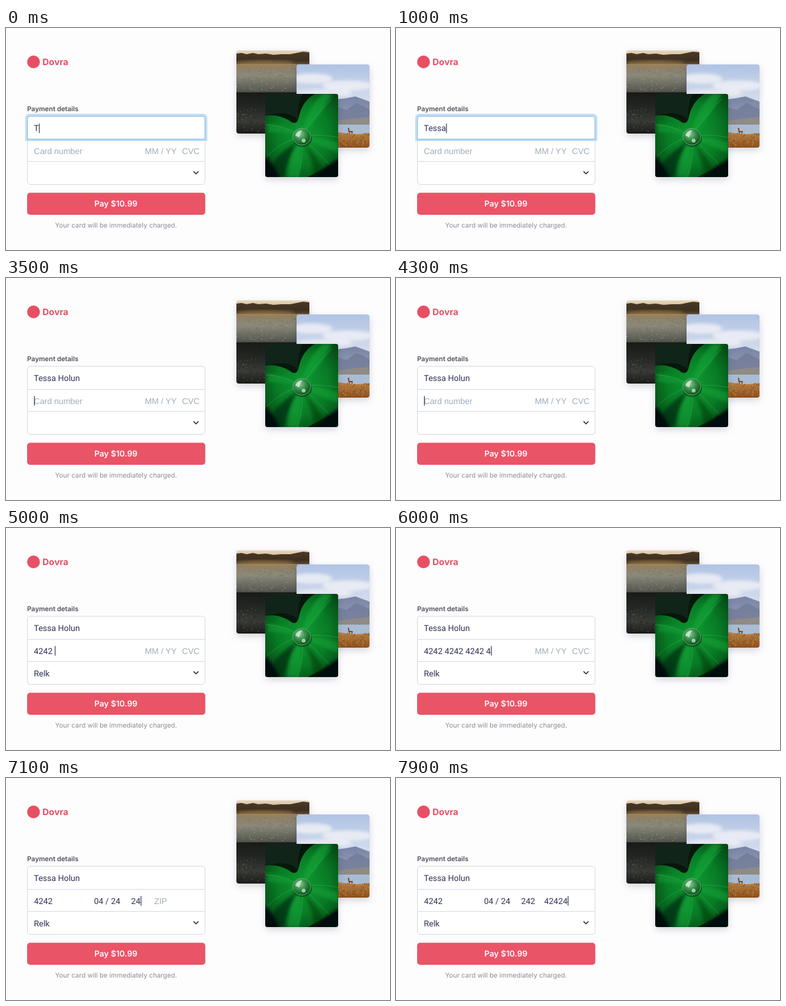
An HTML page for the animation above (8000 ms loop, 600x347 px).

```html
<!DOCTYPE html>
<html lang="en">
<head>
<meta charset="utf-8">
<title>Checkout form</title>
<style>
  html, body { margin: 0; width: 100%; height: 100%; overflow: hidden; background: #fefdfe; }
  svg { display: block; width: 100%; height: 100%; }
  text { white-space: pre; text-rendering: geometricPrecision; }
  .ui { font-family: Inter, sans-serif; }
  .field { font: 13px Roboto, sans-serif; fill: #2f3156; }
  .field.empty { font: 13px "Liberation Sans", Arial, sans-serif; fill: #a1adba; }
  .photo { filter: drop-shadow(0 4px 6px rgba(40, 40, 70, .2)); }
</style>
</head>
<body>
<svg viewBox="0 0 600 347" preserveAspectRatio="none">
  <defs>
    <clipPath id="frame"><rect width="114" height="130" rx="4"/></clipPath>
    <clipPath id="cardRow"><rect x="43" y="176" width="260" height="31"/></clipPath>
    <filter id="soft"><feGaussianBlur stdDeviation="2.5"/></filter>
    <linearGradient id="dusk" x2="0" y2="1">
      <stop offset="0" stop-color="#e6d9c0"/><stop offset="1" stop-color="#b98c4e"/>
    </linearGradient>
    <linearGradient id="trees" x2="0" y2="1">
      <stop offset="0" stop-color="#4a3a26"/><stop offset=".6" stop-color="#3d3021"/><stop offset="1" stop-color="#6b5537"/>
    </linearGradient>
    <linearGradient id="frost" x2="0" y2="1">
      <stop offset="0" stop-color="#8f7c5c"/><stop offset=".4" stop-color="#8a887a"/><stop offset="1" stop-color="#4d5048"/>
    </linearGradient>
    <linearGradient id="soil" x2="0" y2="1">
      <stop offset="0" stop-color="#181a18"/><stop offset=".4" stop-color="#262825"/><stop offset=".7" stop-color="#383a35"/><stop offset="1" stop-color="#1a1917"/>
    </linearGradient>
    <linearGradient id="sky" x2="0" y2="1">
      <stop offset="0" stop-color="#b0c3e4"/><stop offset="1" stop-color="#dde2ee"/>
    </linearGradient>
    <linearGradient id="hill" x2="0" y2="1">
      <stop offset="0" stop-color="#7784a5"/><stop offset="1" stop-color="#a0a6b8"/>
    </linearGradient>
    <linearGradient id="grass" x2="0" y2="1">
      <stop offset="0" stop-color="#bf8d50"/><stop offset="1" stop-color="#8c4e1c"/>
    </linearGradient>
    <radialGradient id="leaf" cx=".52" cy=".48" r=".72">
      <stop offset="0" stop-color="#0f9a32"/><stop offset=".5" stop-color="#087b25"/><stop offset="1" stop-color="#03380f"/>
    </radialGradient>
    <radialGradient id="drop" cx=".4" cy=".35" r=".7">
      <stop offset="0" stop-color="#8fc79a"/><stop offset=".5" stop-color="#2f8a42"/><stop offset="1" stop-color="#0a4a19"/>
    </radialGradient>
  </defs>

  <rect width="600" height="347" fill="#fefdfe"/>

  <!-- Brand -->
  <circle cx="43" cy="53" r="10" fill="#e84f64"/>
  <text class="ui" x="57" y="58.2" font-size="14" font-weight="700" fill="#e84f64">Dovra</text>

  <!-- Form -->
  <text class="ui" x="33" y="130" font-size="10.4" font-weight="600" fill="#4b4d58">Payment details</text>
  <rect x="33.5" y="138" width="277.5" height="106.5" rx="4.5" fill="#fff" stroke="#d3d8e1"/>
  <path d="M33.5 174.2H311M33.5 208.7H311" stroke="#d3d8e1"/>
  <g id="focus" fill="none">
    <path d="M32 174.7V141q0-5 5-5H307.5q5 0 5 5V174.7Z" stroke="#bfe0f5" stroke-width="4"/>
    <path d="M33.5 174.2V142.5q0-4.5 4.5-4.5H306.5q4.5 0 4.5 4.5V174.2Z" stroke="#8fb9dc"/>
  </g>
  <text id="name" class="field" y="161.3"></text>
  <g clip-path="url(#cardRow)">
    <text id="number" class="field" y="196.8"><tspan id="lead"></tspan><tspan id="tail"></tspan></text>
    <text id="expiry" class="field" y="196.8"></text>
    <text id="cvc" class="field" y="196.8"></text>
    <text id="zip" class="field" y="196.8"></text>
  </g>
  <text id="brand" class="field" x="43.5" y="231.7">Relk</text>
  <path d="M293.4 224.5L296.9 228.1L300.4 224.5" fill="none" stroke="#1d1f2b" stroke-width="1.4" stroke-linecap="round" stroke-linejoin="round"/>
  <rect id="caret" width="1.1" height="15" fill="#26284a"/>

  <rect x="33" y="257.6" width="278.4" height="34.3" rx="4.5" fill="#ea5467"/>
  <text class="ui" x="171.7" y="279.4" font-size="12.7" font-weight="600" fill="#fff" text-anchor="middle">Pay $10.99</text>
  <text class="ui" x="172" y="312" font-size="10.4" fill="#8b8d95" text-anchor="middle">Your card will be immediately charged.</text>

  <!-- Frosty field -->
  <g class="photo" transform="translate(360 35)"><g clip-path="url(#frame)">
    <rect width="114" height="24" fill="url(#dusk)"/>
    <path d="M0 5L8 4L16 6L26 4L34 6L46 5L58 7L70 6L84 6L94 4L104 2L114 3V24H0Z" fill="url(#trees)"/>
    <rect y="21" width="114" height="46" fill="url(#frost)"/>
    <ellipse cx="45" cy="20" rx="45" ry="5" fill="#b08a52" opacity=".5" filter="url(#soft)"/>
    <g id="rime"></g>
    <rect y="65.5" width="114" height="65" fill="url(#soil)"/>
    <g id="stubble"></g>
  </g></g>

  <!-- Mountain lake -->
  <g class="photo" transform="translate(454 57)"><g clip-path="url(#frame)">
    <rect width="114" height="70" fill="url(#sky)"/>
    <g fill="#f1f2f7" opacity=".8" filter="url(#soft)">
      <ellipse cx="24" cy="22" rx="32" ry="8"/><ellipse cx="80" cy="33" rx="40" ry="8"/><ellipse cx="42" cy="45" rx="45" ry="6"/>
    </g>
    <path d="M0 64L18 57L36 61L58 55L76 53L92 50L114 58V100H0Z" fill="url(#hill)"/>
    <path d="M40 82L62 66L78 71L94 60L114 70V96H30Z" fill="#727b98" opacity=".8"/>
    <path d="M30 94L76 86L114 82V97H30Z" fill="#8f8b86"/>
    <rect y="94" width="114" height="14" fill="#a9bcd4"/>
    <path d="M0 100Q40 101 66 106T114 107V130H0Z" fill="url(#grass)"/>
    <g id="tufts"></g>
    <path d="M81 104h7l-1 5h-1v-3h-3v3h-1zM80 99h2l1 6h-2z" fill="#7a4a22"/>
  </g></g>

  <!-- Leaf with a drop -->
  <g class="photo" transform="translate(405 103)"><g clip-path="url(#frame)">
    <rect width="114" height="130" fill="#06170b"/>
    <path d="M0 34Q20 31 38 42Q50 52 53 34Q59 10 78 0H114V104Q94 116 66 130H20Q10 112 0 100Z" fill="url(#leaf)"/>
    <path d="M0 0H58Q50 18 51 40Q36 24 0 34Z" fill="#10241a"/>
    <g filter="url(#soft)">
      <path d="M58 62Q62 26 90 0H104Q84 40 58 62Z" fill="#17a83a" opacity=".6"/>
      <path d="M58 68Q86 66 114 76V92Q86 82 58 68Z" fill="#17a83a" opacity=".5"/>
      <path d="M54 72Q40 90 34 130H52Q60 100 54 72Z" fill="#17a83a" opacity=".55"/>
      <path d="M52 64Q28 48 4 46V60Q30 60 52 64Z" fill="#17a83a" opacity=".45"/>
      <path d="M52 74Q26 88 8 112L20 130H30Q36 100 52 74Z" fill="#032c0d" opacity=".7"/>
      <path d="M60 78Q74 100 76 130H98Q84 98 60 78Z" fill="#032c0d" opacity=".45"/>
      <path d="M0 96Q14 112 24 132H-6ZM118 100Q94 112 72 134H118Z" fill="#050e08"/>
    </g>
    <path d="M57 66Q32 50 0 48M57 66Q26 74 2 98M57 66Q62 96 50 130M57 66Q82 92 100 110M57 66Q86 62 114 68M57 66Q78 32 104 8" fill="none" stroke="#47bd5b" stroke-opacity=".4"/>
    <ellipse cx="58" cy="70" rx="15" ry="13" fill="#043c12" opacity=".6"/>
    <ellipse cx="57" cy="67" rx="14" ry="13" fill="url(#drop)" stroke="#7ab985" stroke-width=".8"/>
    <path d="M47 65Q50 57 58 57Q54 62 53 68Z" fill="#d8f1dc" opacity=".8"/>
    <circle cx="60" cy="73" r="3" fill="#c9edcf" opacity=".75"/>
  </g></g>
</svg>
<script>
  const LOOP = 8000, STEP = 100;
  const $ = id => document.getElementById(id);

  function scatter(group, count, top, bottom, colours, seed) {
    const random = () => (seed = seed * 16807 % 2147483647) / 2147483647;
    for (let i = 0; i < count; i++) {
      const blade = document.createElementNS("http://www.w3.org/2000/svg", "path");
      const x = random() * 114, y = top + random() * (bottom - top);
      blade.setAttribute("d", `M${x} ${y}l${random() * 4 - 2} -${.5 + random() * 2}`);
      blade.setAttribute("stroke", colours[i % colours.length]);
      group.append(blade);
    }
  }
  scatter($("rime"), 160, 28, 64, ["#9c9a8c", "#6f6e60", "#7f7d6e"], 29);
  scatter($("stubble"), 170, 92, 128, ["#595c54", "#1c1d1a", "#484a42"], 17);
  scatter($("tufts"), 150, 109, 130, ["#d39a4c", "#6f3b16", "#b9702a"], 71);

  // Each field: key presses, their times, left edge before and after the slide.
  const every = (start, gap, count) => Array.from({ length: count }, (_, i) => start + i * gap);
  const fields = {
    name: { keys: [..."Tessa Holun"], times: [0, 300, 500, 700, 900, ...every(1100, 180, 6)], hint: "", from: 43.5, to: 43.5, focus: 0, row: 149.3 },
    number: { keys: Array.from({ length: 16 }, (_, i) => (i % 2 ? "2" : "4") + (i % 4 === 3 && i < 15 ? " " : "")),
      times: [4400, 4600, 4700, 4900, ...every(5100, 105, 12)], hint: "Card number", from: 43.5, to: -53.7, focus: 3100, row: 184.5 },
    expiry: { keys: ["0", "4 / ", "2", "4"], times: [6500, 6600, 6700, 6800], hint: "MM / YY", from: 217, to: 137.5, focus: 6350, row: 184.5 },
    cvc: { keys: [..."242"], times: [6900, 7000, 7200], hint: "CVC", from: 275, to: 195.5, focus: 6850, row: 184.5 },
    zip: { keys: [..."42424"], times: every(7350, 105, 5), hint: "ZIP", from: 319, to: 231.5, focus: 7250, row: 184.5 }
  };
  const SLIDE = { start: 6375, length: 500 };
  const LEAD = "4242 4242 4242 ".length;
  const clamp = v => Math.min(1, Math.max(0, v));

  // CSS "ease": cubic-bezier(.25, .1, .25, 1)
  function ease(p) {
    const curve = (a, b, u) => 3 * a * u * (1 - u) ** 2 + 3 * b * u * u * (1 - u) + u ** 3;
    let low = 0, high = 1;
    for (let i = 0; i < 20; i++) {
      const mid = (low + high) / 2;
      if (curve(.25, .25, mid) < p) low = mid; else high = mid;
    }
    return curve(.1, 1, low);
  }

  function setText(id, text) {
    if (id !== "number") return $(id).textContent = text;
    $("lead").textContent = text.slice(0, LEAD);
    $("tail").textContent = text.slice(LEAD);
  }

  function draw(t) {
    const slide = ease(clamp((t - SLIDE.start) / SLIDE.length));
    let caret;
    for (const [id, f] of Object.entries(fields)) {
      const el = $(id), typed = f.times.filter(time => time <= t);
      const value = f.keys.slice(0, typed.length).join("");
      const x = f.from + (f.to - f.from) * slide;
      el.setAttribute("x", x);
      setText(id, value || f.hint);
      el.classList.toggle("empty", !value);
      if (t >= f.focus) {
        const last = Math.max(f.focus, ...typed);
        caret = { el, x, value, row: f.row, on: Math.floor((t - last) / 500) % 2 === 0 };
      }
    }
    const width = caret.value ? caret.el.getComputedTextLength() : 0;
    $("caret").setAttribute("x", caret.x + width + .3);
    $("caret").setAttribute("y", caret.row);
    $("caret").style.opacity = caret.on ? 1 : 0;
    // All but the last four digits fade as the number slides away.
    $("lead").style.fillOpacity = clamp(1 - slide * 1.2);
    $("brand").style.opacity = t >= fields.number.times[0] ? 1 : 0;
    $("focus").style.opacity = 1 - clamp((t - fields.number.focus + 50) / 200);
  }

  // The picture advances ten times a second.
  const begin = performance.now();
  function tick() {
    draw(Math.floor((performance.now() - begin) % LOOP / STEP) * STEP);
    requestAnimationFrame(tick);
  }
  tick();
</script>
</body>
</html>
```
